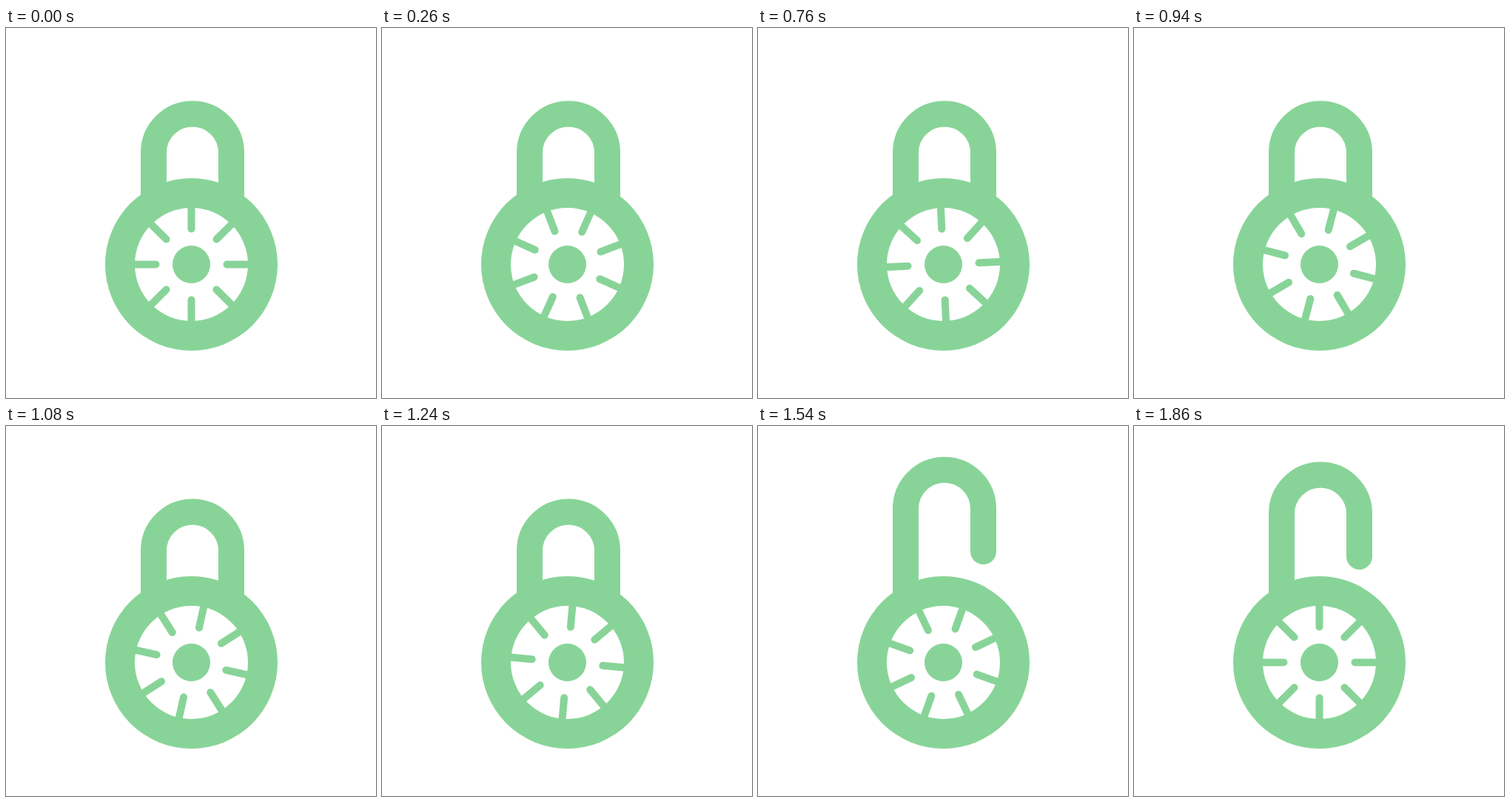
Animation, 500 px wide and 500 px high, one loop 3.04 s. Source, as an HTML page with a canvas:

```html
<!DOCTYPE html>
<html lang="en">
<head>
<meta charset="utf-8">
<title>Combination lock</title>
<style>
  html, body { margin: 0; width: 100%; height: 100%; overflow: hidden; background: #fff; }
  canvas { display: block; width: 500px; height: 500px; }
</style>
</head>
<body>
<canvas id="stage" width="500" height="500"></canvas>
<script>
const ctx = document.getElementById('stage').getContext('2d');
const GREEN = '#88d498';
const LOOP = 3040;
const CX = 250.5, CY = 319.5;

// [time in ms, value], eased in and out between neighbours
const DIAL = [[0, 0], [609, 175.8], [1250, -130], [1866, 0]];
const LIFT = [[1300, 0], [1580, 60], [1866, 50]];

function valueAt(keys, t) {
  if (t <= keys[0][0]) return keys[0][1];
  for (let i = 1; i < keys.length; i++) {
    const [t0, v0] = keys[i - 1];
    const [t1, v1] = keys[i];
    if (t < t1) {
      const p = (t - t0) / (t1 - t0);
      return v0 + (v1 - v0) * p * p * (3 - 2 * p);
    }
  }
  return keys[keys.length - 1][1];
}

function disc(r, color) {
  ctx.fillStyle = color;
  ctx.beginPath();
  ctx.arc(CX, CY, r, 0, Math.PI * 2);
  ctx.fill();
}

function drawShackle(lift) {
  ctx.lineWidth = 35;
  ctx.beginPath();
  ctx.moveTo(199.5, 235);
  ctx.lineTo(199.5, 168.5 - lift);
  ctx.arc(252, 168.5 - lift, 52.5, Math.PI, 0);
  ctx.lineTo(304.5, 226.5 - lift);
  ctx.stroke();
}

function drawTicks(degrees) {
  ctx.save();
  ctx.translate(CX, CY);
  ctx.rotate(degrees * Math.PI / 180);
  ctx.lineWidth = 10;
  ctx.beginPath();
  for (let i = 0; i < 8; i++) {
    ctx.moveTo(0, -48);
    ctx.lineTo(0, -80);
    ctx.rotate(Math.PI / 4);
  }
  ctx.stroke();
  ctx.restore();
}

function draw(t) {
  ctx.fillStyle = '#fff';
  ctx.fillRect(0, 0, 500, 500);
  ctx.strokeStyle = GREEN;
  ctx.lineCap = 'round';
  drawShackle(valueAt(LIFT, t));
  disc(116.5, GREEN);
  disc(76.5, '#fff');
  drawTicks(valueAt(DIAL, t));
  disc(25.5, GREEN);
}

const start = performance.now();
function frame() {
  draw((performance.now() - start) % LOOP);
  requestAnimationFrame(frame);
}
frame();
</script>
</body>
</html>
```
